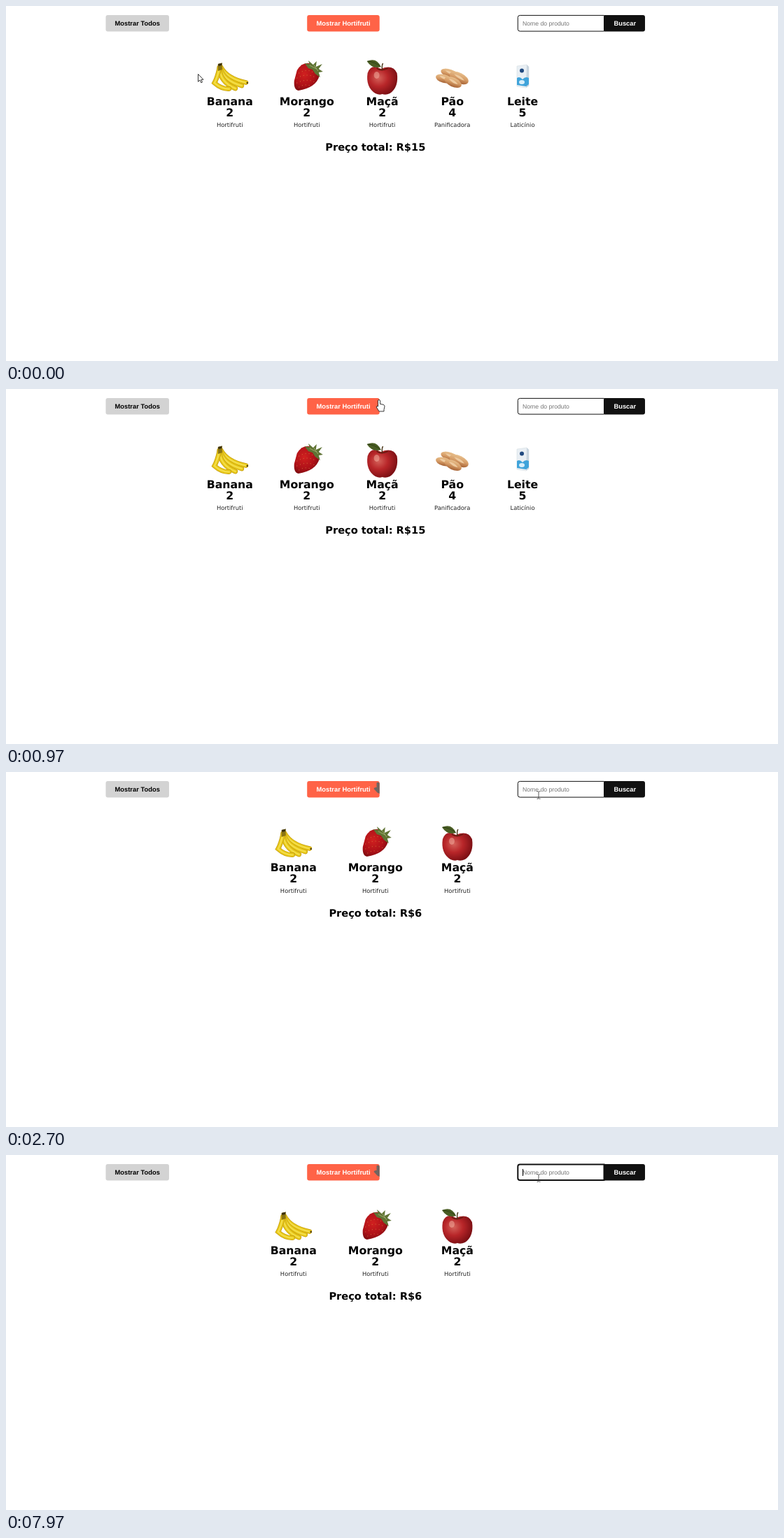
Write an HTML page that moves like this. It is 1103 px wide and 508 px high and loops after 8 s.

```html
<!DOCTYPE html>
<html lang="pt-BR">
<head>
<meta charset="utf-8">
<title>Produtos</title>
<style>
  html, body { margin: 0; width: 100%; height: 100%; overflow: hidden; background: #fff; }
  svg { display: block; width: 100vw; height: 100vh; }
  text { text-rendering: geometricPrecision; }
  .name, .total { font: bold 15.7px "DejaVu Sans", sans-serif; text-anchor: middle; }
  .total { font-size: 14.6px; }
  .kind { font: 8.35px "DejaVu Sans", sans-serif; text-anchor: middle; fill: #222; }
  .label { font: bold 9.4px "Liberation Sans", sans-serif; text-anchor: middle; }
  .hint { font: 8.67px "Liberation Sans", sans-serif; fill: #757575; }
  .card { fill: #fff; filter: drop-shadow(3px 3px 4px #0007); }
  .pointer { fill: #fff; stroke: #222; stroke-width: .9; stroke-linejoin: round; }
</style>
</head>
<body>
<svg viewBox="0 0 1103 508">
  <defs>
    <radialGradient id="berry" cx=".4" cy=".4" r=".7">
      <stop stop-color="#d0201f"/><stop offset=".6" stop-color="#ae1118"/><stop offset="1" stop-color="#720a0e"/>
    </radialGradient>
    <radialGradient id="apple" cx=".38" cy=".4" r=".68">
      <stop stop-color="#d4625a"/><stop offset=".45" stop-color="#b82629"/><stop offset="1" stop-color="#740c11"/>
    </radialGradient>
    <linearGradient id="crust" x2=".3" y2="1">
      <stop stop-color="#ecc896"/><stop offset=".6" stop-color="#d69c66"/><stop offset="1" stop-color="#ac6a3c"/>
    </linearGradient>
  </defs>

  <rect x="142.5" y="13" width="90.5" height="23.5" rx="3" fill="#d3d3d3"/>
  <text class="label" x="187.7" y="28.2">Mostrar Todos</text>
  <rect x="430.2" y="13" width="103.5" height="23.5" rx="3" fill="tomato"/>
  <text class="label" x="482" y="28.2" fill="#fff">Mostrar Hortifruti</text>
  <path id="smudge" d="M529.5 15.5Q531 14 533.7 16V31L530.5 29.5 525.5 24Q526 21.5 529.5 22Z" fill="#706561"/>
  <path d="M855 13h55a3 3 0 0 1 3 3v17.500a3 3 0 0 1-3 3h-55z" fill="#111"/>
  <text class="label" x="884.3" y="28.2" fill="#fff">Buscar</text>
  <path id="field" d="M854.500 13.400H734.300a3 3 0 0 0-3 3v16.700a3 3 0 0 0 3 3H854.500z" fill="#fff" stroke="#111"/>
  <text class="hint" x="738" y="28">Nome do produto</text>
  <rect id="caret" x="738" y="20" width="1" height="10"/>

  <g id="products"></g>
  <text id="total" class="total" x="527.8" y="207"></text>

  <circle id="click" r="7.8" fill="#f5eb00" opacity=".6"/>
  <g id="cursor">
    <path id="arrow" class="pointer" d="M.5 .5V11.300L3 9 4.800 12.800 6.500 12 4.800 8.300H8Z"/>
    <path id="hand" class="pointer" d="M-1.500 9V1a1.500 1.500 0 0 1 3 0V5.500L6 6.300Q8 7 8 9L7 13.500V16H0L-3.700 10Q-4 7.500-1.500 9Z"/>
    <path id="beam" d="M-2.500-5.300H-.8L0-4.500.8-5.300H2.500M-2.500 5.300H-.8L0 4.500.8 5.300H2.500M0-4.500V4.500" fill="none" stroke="#444" stroke-width=".9"/>
  </g>
</svg>

<script>
const LOOP = 8000, STEP = 69;
const FILTER_AT = 2070, FOCUS_AT = 4820, CLICK_LENGTH = 130;
const $ = id => document.getElementById(id);
const show = (el, on) => { el.style.display = on ? '' : 'none'; };

const bananaCurves = ['M-13 87Q-4 104 23 109.500', 'M-14 88Q-9 107 17 114',
                      'M-15 88Q-14 109 8 118', 'M-15 89Q-18 103-22 110Q-12 119-1 118.500'];
const banana = bananaCurves.map(d => `<g fill="none" stroke-linecap="round">
  <path d="${d}" stroke="#c59d10" stroke-width="6.800"/>
  <path d="${d}" stroke="#e8c818" stroke-width="5.300"/>
  <path d="${d}" stroke="#f4de4c" stroke-width="2"/></g>`).join('') +
  `<path d="M-17 83L-11 81.500-11 91-17 93Z" fill="#8b7412"/><path d="M-17 83L-11 81.500-12 85-16 86Z" fill="#3c310b"/>
  <circle cx="25" cy="110" r="1.300" fill="#4c3b10"/>`;

const strawberry = `<path d="M-14 92Q-7 80 4 82 16 88 18 100 13 117-12 121-19 120-18 107Z" fill="url(#berry)"/>
  <path d="M-11 96Q0 89 9 95M-14 103Q0 95 14 103M-14 110Q0 103 11 109M-11 116Q-4 111 5 114"
    fill="none" stroke="#d98f45" stroke-width=".9" stroke-linecap="round" stroke-dasharray="0 5"/>
  <path d="M-3 82L4 83 2 78 9 84 14 79 13 87 22 83 17 90 23 94 17 95 19 102 12 97 8 91 2 89Z" fill="#5f7334"/>
  <path d="M4 85L14 90M10 84L16 93" stroke="#a9b777" stroke-width=".8"/>`;

const apple = `<path d="M-2 90Q-16 82-21 96-24 116-10 125-4 128 0 126 5 128 11 125 24 116 21 96 15 83-2 90Z" fill="url(#apple)"/>
  <path d="M-8 89Q-1 94 8 89" fill="none" stroke="#6c1c14" stroke-width="2"/>
  <path d="M0 91Q-1 85 1 82" fill="none" stroke="#4a3518" stroke-width="1.400"/>
  <path d="M-22 79Q-8 73-2 87-14 91-22 79Z" fill="#4a5d24"/>
  <path d="M-21 79Q-10 80-2 87" fill="none" stroke="#293b12" stroke-width=".8"/>
  <ellipse cx="-8" cy="99" rx="4" ry="5" fill="#f5b5a5" opacity=".5"/>`;

const roll = (x, y, angle, rx, ry) => `<g transform="translate(${x} ${y}) rotate(${angle})">
  <ellipse rx="${rx}" ry="${ry}" fill="url(#crust)"/>
  <path d="M${-rx * .6}-2Q0-5 ${rx * .6} 0Q0 2 ${-rx * .6}-2Z" fill="#eecba0"/></g>`;
const bread = roll(-3, 97, 20, 14, 6) + roll(9.5, 103, 25, 14.5, 7.5) +
  roll(-12, 104, 15, 12, 6) + roll(1, 109, 25, 13, 6.5);

const milk = `<path d="M-8 86L6 84 9 87 9 114 5 117-8 115Z" fill="#e9eff4" stroke="#d5dde3" stroke-width=".6"/>
  <path d="M6 84L9 87V114L5 117Z" fill="#c9d5df"/>
  <path d="M-8 103Q-4 100 0 105 4 100 9 103V112L5 115-8 113Z" fill="#3fa3da"/>
  <ellipse cx="-1" cy="109" rx="4" ry="3" fill="#d8eefa"/>
  <circle cx="-1" cy="92.500" r="3" fill="#20497f"/>`;

const products = [
  { name: 'Banana',  price: 2, kind: 'Hortifruti',   x: 319.8, half: 45.7, filteredX: 410.7, art: banana },
  { name: 'Morango', price: 2, kind: 'Hortifruti',   x: 429.8, half: 52, filteredX: 527.8, art: strawberry },
  { name: 'Maçã',    price: 2, kind: 'Hortifruti',   x: 537.6, half: 44, filteredX: 644.9, art: apple },
  { name: 'Pão',     price: 4, kind: 'Panificadora', x: 637.7, half: 44, art: bread },
  { name: 'Leite',   price: 5, kind: 'Laticínio',    x: 738,   half: 44, art: milk }
];

$('products').innerHTML = products.map(p => `<g>
  <rect class="card" x="${-p.half}" y="62.500" width="${2 * p.half}" height="125" rx="3"/>${p.art}
  <text class="name" y="142">${p.name}</text><text class="name" y="158">${p.price}</text>
  <text class="kind" y="173.300">${p.kind}</text></g>`).join('');
products.forEach((p, i) => {
  p.node = $('products').children[i];
  p.card = p.node.querySelector('.card');
});

// Cursor path: [step, x, y]
const path = [[0, 274, 97], [7, 368, 74], [12, 513, 39], [13, 531, 22], [14, 533, 16],
              [24, 484, 25], [30, 484, 25], [39, 761, 33]];

function cursorAt(step) {
  const next = path.findIndex(key => key[0] > step);
  if (next < 0) return path[path.length - 1].slice(1);
  if (next === 0) return path[0].slice(1);
  const [s0, x0, y0] = path[next - 1], [s1, x1, y1] = path[next];
  const k = (step - s0) / (s1 - s0);
  return [Math.round(x0 + (x1 - x0) * k), Math.round(y0 + (y1 - y0) * k)];
}

const inside = ([x, y], left, right, top, bottom) => x > left && x < right && y > top && y < bottom;

function draw(t) {
  const step = Math.floor(t / STEP);
  const pos = cursorAt(step), before = cursorAt(step - 1);
  const filtered = t >= FILTER_AT, focused = t >= FOCUS_AT;

  // The hover shadow trails the cursor by one step.
  let sum = 0;
  for (const p of products) {
    const visible = !filtered || p.kind === 'Hortifruti';
    const x = filtered ? p.filteredX : p.x;
    show(p.node, visible);
    if (!visible) continue;
    sum += p.price;
    p.node.setAttribute('transform', `translate(${x} 0)`);
    show(p.card, inside(before, x - p.half, x + p.half, 62, 188));
  }
  $('total').textContent = 'Preço total: R$' + sum;

  const onButton = inside(pos, 430, 534, 13, 37), onField = inside(pos, 731, 855, 13, 37);
  show($('hand'), onButton);
  show($('beam'), onField);
  show($('arrow'), !onButton && !onField);
  show($('smudge'), step > 14);

  const place = `translate(${pos})`;
  $('cursor').setAttribute('transform', place);
  $('click').setAttribute('transform', place);
  show($('click'), [FILTER_AT - CLICK_LENGTH, FOCUS_AT].some(s => t >= s && t < s + CLICK_LENGTH));

  $('field').setAttribute('stroke-width', focused ? 2 : 1);
  show($('caret'), focused && Math.floor((t - FOCUS_AT) / 524) % 2 === 0);
}

const start = performance.now();
function frame() {
  draw((performance.now() - start) % LOOP);
  requestAnimationFrame(frame);
}
frame();
</script>
</body>
</html>
```
